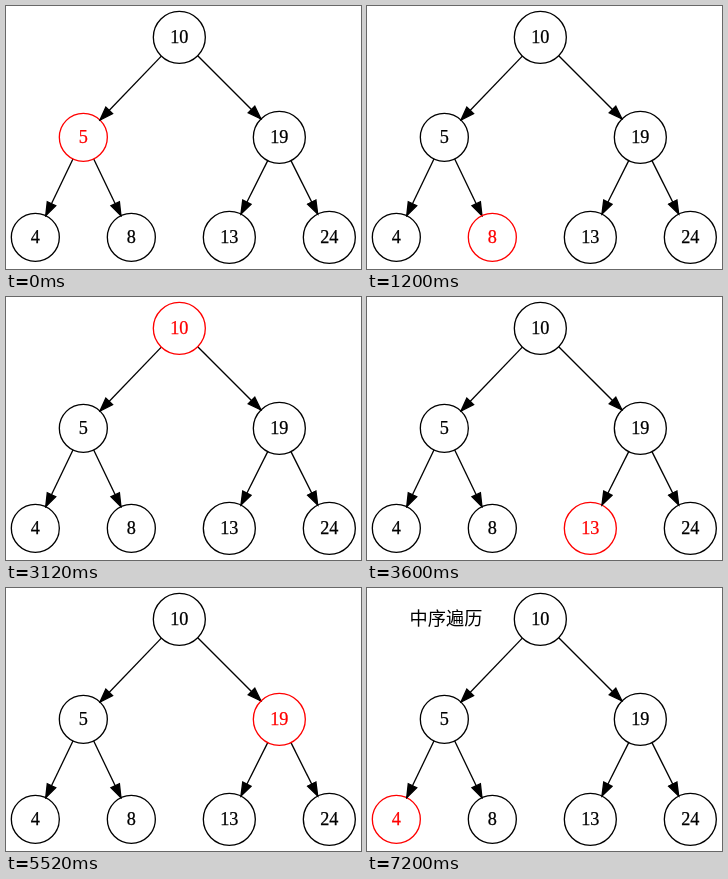
These frames come from a looping animation (355x263 px, 8.4 s). An HTML page:

```html
<!DOCTYPE html>
<html lang="zh-CN">
<head>
<meta charset="utf-8">
<style>
  html, body { margin: 0; width: 100%; height: 100%; overflow: hidden; background: #fff; }
  svg { display: block; }
  text { font: 18.2px "Liberation Serif", serif; text-anchor: middle; fill: #000; stroke: #000; stroke-width: .25; }
  circle, line { fill: none; stroke: #000; stroke-width: 1.33; }
  .active circle { stroke: #f00; }
  .active text { fill: #f00; stroke: #f00; }
  #title { font: 300 18.2px "Noto Sans CJK SC", "Noto Sans CJK", sans-serif; stroke: none; }
</style>
</head>
<body>
<svg width="355" height="263" viewBox="0 0 355 263">
  <defs>
    <marker id="arrow" markerUnits="userSpaceOnUse" markerWidth="16" markerHeight="12"
            viewBox="-1 -6 16 12" refX="13.33" refY="0" orient="auto">
      <path d="M0-4.67 13.33 0 0 4.67Z" stroke="#000" stroke-width="1.33"/>
    </marker>
  </defs>
  <text id="title" x="79" y="37.3">中序遍历</text>
</svg>
<script>
const STEP = 1200, MARGIN = 5.33, GAP = 24, ROW = 100, LEAF_Y = 231.33;
const svg = document.querySelector('svg');
const title = document.getElementById('title');
const values = [4, 5, 8, 10, 13, 19, 24];

function add(parent, tag, attrs = {}) {
  const el = document.createElementNS(svg.namespaceURI, tag);
  for (const key in attrs) el.setAttribute(key, attrs[key]);
  return parent.appendChild(el);
}

// In sorted order, the lowest set bit of the 1-based position gives the tree level.
let cursor = MARGIN;
const nodes = values.map((value, i) => {
  const reach = (i + 1) & -(i + 1);
  const r = value < 10 ? 24 : 26;
  const half = reach === 1 ? r : GAP;
  const x = cursor + half;
  cursor = x + half;
  return { value, reach, r, x, y: LEAF_Y - ROW * Math.log2(reach) };
});

function connect(a, b) {
  const length = Math.hypot(b.x - a.x, b.y - a.y);
  const ux = (b.x - a.x) / length, uy = (b.y - a.y) / length;
  add(svg, 'line', {
    x1: a.x + ux * a.r, y1: a.y + uy * a.r,
    x2: b.x - ux * b.r, y2: b.y - uy * b.r,
    'marker-end': 'url(#arrow)'
  });
}

nodes.forEach((node, i) => {
  if (node.reach > 1)
    for (const side of [-1, 1]) connect(node, nodes[i + side * node.reach / 2]);
  node.group = add(svg, 'g');
  add(node.group, 'circle', { cx: node.x, cy: node.y, r: node.r });
  add(node.group, 'text', { x: node.x, y: node.y + 5.2 }).textContent = node.value;
});

function draw() {
  const active = (Math.floor(performance.now() / STEP) + 1) % nodes.length;
  nodes.forEach((node, i) => node.group.classList.toggle('active', i === active));
  title.style.visibility = active === 0 ? 'visible' : 'hidden';
  requestAnimationFrame(draw);
}
draw();
</script>
</body>
</html>
```
